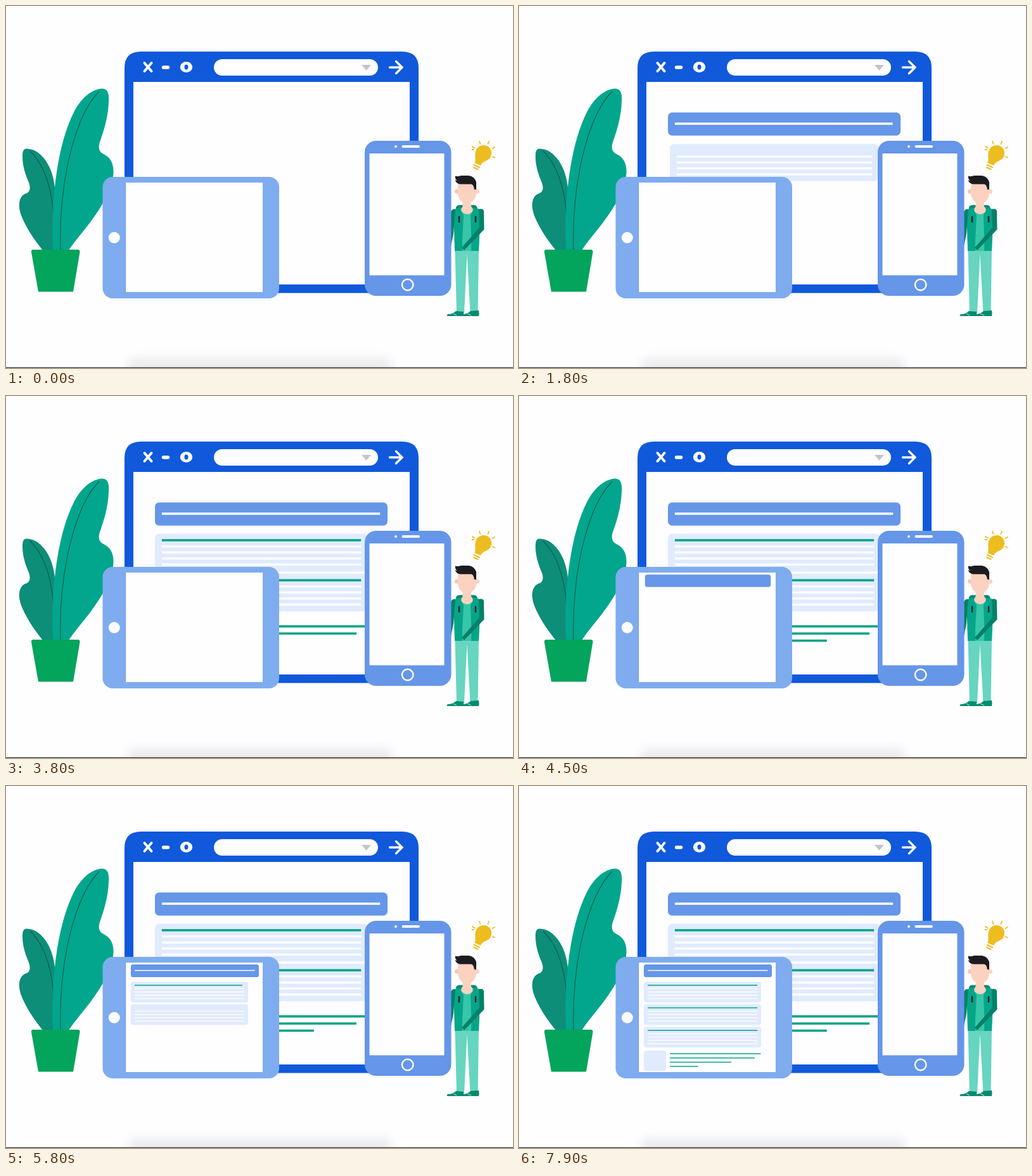
An HTML page that plays this animation: 800x572 px, repeating every 8 s.

```html
<!DOCTYPE html>
<html lang="en">
<head>
<meta charset="utf-8">
<title>Responsive layouts</title>
<style>
  html, body { margin: 0; width: 100%; height: 100%; overflow: hidden; background: #fefdff; }
  svg { display: block; width: 100vw; height: 100vh; }
</style>
</head>
<body>
<svg viewBox="0 0 800 572">
  <defs>
    <filter id="soft" x="-20%" y="-100%" width="140%" height="300%"><feGaussianBlur stdDeviation="8"/></filter>
  </defs>
  <rect width="800" height="572" fill="#fefdff"/>
  <rect x="193" y="557" width="415" height="40" rx="8" fill="#ebebec" filter="url(#soft)"/>
  <rect y="570.8" width="800" height="1.2" fill="#3c3c3f"/>

  <g id="plant">
    <path fill="#0d8e78" d="M33 225.500C44 226 52 231 61 242C72 257 77 275 78 300L80 386H58C44 369 29 346 23 328C18 311 22 299 32 296C38 294 39 287 36 279C29 263 26 250 26 237C26 229 28 225 33 225.500Z"/>
    <path fill="none" stroke="#0b5f53" stroke-width="1.200" d="M38 229C61 252 72 287 75 331"/>
    <path fill="#02a68c" d="M152 130.500C161 131 163 139 162 152C161 177 154 198 148 215C145 224 147 231 154 234C166 240 170 250 169.500 264C168 288 153 315 132 343C119 360 109 371 99 386H74C73 352 73 315 78 277C83 237 92 197 108 166C119 145 136 131 152 130.500Z"/>
    <path fill="none" stroke="#0b5f53" stroke-width="1.200" d="M147 135C112 170 83 268 86 386"/>
    <path fill="#03a45b" d="M43 385H113Q117 385 116.500 389L106 451.500H51L40 389Q39.500 385 43 385Z"/>
  </g>

  <g id="browser">
    <path fill="#1059db" d="M187 98Q187 72 213 72H625Q651 72 651 98V453.500H187Z"/>
    <rect x="201" y="120" width="436" height="320" fill="#fefdff"/>
    <g fill="none" stroke="#fefdff" stroke-linecap="round">
      <path stroke-width="4" d="M218.500 90L229.500 103M229.500 90L218.500 103"/>
      <path stroke-width="5.500" d="M248.500 97H255.500"/>
      <path stroke-width="3.400" d="M605.500 97H624M615.500 87.500L625 97L615.500 106.500"/>
    </g>
    <ellipse cx="284.500" cy="96.500" rx="9.700" ry="8.500" fill="#fefdff"/>
    <ellipse cx="284.500" cy="96.500" rx="3" ry="4" fill="#1059db"/>
    <rect x="328" y="84" width="259" height="26" rx="13" fill="#fefdff"/>
    <path fill="#c5c4c8" d="M561 93H576L568.500 102Z"/>
    <g id="browserPage"></g>
  </g>

  <g id="tablet">
    <rect x="152.500" y="270" width="278.500" height="192" rx="16" fill="#7facee"/>
    <rect x="189" y="279" width="216" height="173" fill="#fefdff"/>
    <path stroke="#6b97da" stroke-width="1" d="M188.500 279V452"/>
    <circle cx="170.800" cy="366" r="9" fill="#fefdff"/>
    <g id="tabletPage"></g>
  </g>

  <g id="man">
    <path fill="#67d5bf" d="M708.500 386H746L744.500 485H732.500L727.500 392L723 485H711Z"/>
    <path fill="#078b70" d="M710 482L722 483V490H697Q694 489 697 487Q705 487 710 482ZM733 482L746 481Q747 486 746 490H720Q717 489 720 487Q728 487 733 482Z"/>
    <path fill="none" stroke="#fefdff" stroke-width=".8" d="M706 486L711 489M728 486L734 489"/>
    <path fill="#058a70" d="M710 322Q709 315 715 314.500H739Q744 315 744 322Z"/>
    <path fill="#06a58a" d="M706 322Q711 319 718 319H737Q744 319 749 322L746 387H708Z"/>
    <path fill="#36c6a8" d="M718 321H737L734 387H720Z"/>
    <path fill="#06a58a" d="M717 320L722 331L719 387H708L709 321ZM737 320L733 331L735 387H746L747 321Z"/>
    <path fill="#fbd2bf" d="M720.500 305H734V317Q738 320 736 325Q728 333 719 325Q717 320 720.500 317Z"/>
    <path fill="none" stroke="#16272a" stroke-width="2.600" stroke-linecap="round" d="M715 333V341M741 333V341"/>
    <path fill="#068068" d="M702 325Q705 319 709 322L706 360L699.500 392Q696 394 694 391L699 356ZM746 321Q753 319 754 324L754.500 353L723 386L719 382L747 350Z"/>
    <circle cx="711.500" cy="293" r="3.500" fill="#f8c5b0"/>
    <circle cx="743.500" cy="293" r="3.500" fill="#fbd2bf"/>
    <path fill="#fbd2bf" d="M713 278H742V297Q740 311 727.500 311.500Q715 311 713 297Z"/>
    <path fill="#1c1b20" d="M709 268.500Q713 270 718 268H730Q739 269 742 278V290H739Q738 282 734 281.500H717Q711 281 708.500 275L712 276Q708 273 709 268.500Z"/>
  </g>

  <g id="bulb" fill="#edbd20" stroke="#edbd20" stroke-linecap="round">
    <path stroke="none" d="M741 230C743 222 751 218 759 221C767 225 768 235 763 241C758 246 752 245 749 252L739.500 248C742 241 739 238 741 230Z"/>
    <path fill="none" stroke-width="2" d="M738.500 251L747 255M738 255L744.500 258"/>
    <path fill="none" stroke-width="1.800" d="M747 214L748.500 218M762 214L760.500 218M771 223L767.500 225M771 239.500L767.500 238M736 222L739.500 224.500M735.500 227H738"/>
  </g>

  <g id="phone">
    <rect x="566" y="213" width="136.500" height="245" rx="18" fill="#6596e8"/>
    <rect x="573.500" y="233" width="118" height="192.500" fill="#fefdff"/>
    <circle cx="615" cy="222" r="2" fill="#fefdff"/>
    <rect x="624.500" y="220" width="28.500" height="4" rx="2" fill="#fefdff"/>
    <circle cx="633.700" cy="440.500" r="8.800" fill="none" stroke="#fefdff" stroke-width="2.400"/>
  </g>
</svg>
<script>
const LOOP = 8000;
const WHITE = '#fefdff', GREEN = '#06a487', PALE = '#e0ebfe', BLUE = '#6596e8';
const updates = [];

function add(parent, tag, attrs) {
  const node = document.createElementNS('http://www.w3.org/2000/svg', tag);
  for (const key in attrs) node.setAttribute(key, attrs[key]);
  return parent.appendChild(node);
}

function ease(p) {
  p = Math.min(1, Math.max(0, p));
  return p < .5 ? 4 * p ** 3 : 1 - 4 * (1 - p) ** 3;
}

// A rounded panel that grows from its centre.
function panel(parent, x, y, w, h, r, fill, start, dur = 600) {
  const group = add(parent, 'g', {});
  const cx = x + w / 2, cy = y + h / 2;
  add(group, 'rect', { x, y, width: w, height: h, rx: r, fill });
  updates.push(t => {
    const k = ease((t - start) / dur);
    group.setAttribute('visibility', k ? 'visible' : 'hidden');
    group.setAttribute('transform', `translate(${cx} ${cy}) scale(${k}) translate(${-cx} ${-cy})`);
  });
  return group;
}

function stroke(parent, x, y, w, thick, color) {
  return add(parent, 'rect', { x, y: y - thick / 2, width: w, height: thick, fill: color });
}

// A line that is drawn from left to right.
function drawn(parent, x, y, w, thick, color, start, dur = 600) {
  const line = stroke(parent, x, y, 0, thick, color);
  updates.push(t => line.setAttribute('width', w * ease((t - start) / dur)));
}

function page(id, { x, y, scale: s, thick, blocks, pitch, footer, gaps, start, footerStart }) {
  const root = document.getElementById(id);
  panel(root, x, y, 202 * s, 20 * s, 3.6 * s, BLUE, start);
  drawn(root, x + 6 * s, y + 10 * s - .5, 189.500 * s, thick, WHITE, start + 550);

  for (let i = 0; i < blocks; i++) {
    const top = y + (27.2 + i * pitch) * s;
    const begin = start + 600 * (i + 1);
    const block = panel(root, x, top, 185 * s, 32.7 * s, 4 * s, PALE, begin);
    for (let j = 0; j < 4; j++) {
      stroke(block, x + 6 * s, top + (11 + j * 5.25) * s, 173 * s, thick, WHITE);
    }
    drawn(root, x + 6 * s, top + 5.6 * s, 173 * s, thick, GREEN, begin + 700);
  }

  panel(root, x, footer - 5 * s, 35 * s, 32 * s, 4 * s, PALE, footerStart - 400, 500);
  [143.5, 134, 97, 44.5].forEach((w, i) =>
    drawn(root, x + 41 * s, footer + gaps * i, w * s, thick, GREEN, footerStart + 300 * i, 400));
}

page('browserPage', {
  x: 235, y: 168.3, scale: 1.817, thick: 3.6, blocks: 2, pitch: 34.8,
  footer: 364, gaps: 11.3, start: 700, footerStart: 3050
});
page('tabletPage', {
  x: 197, y: 282, scale: 1, thick: 1.5, blocks: 3, pitch: 35.7,
  footer: 423, gaps: 6.7, start: 4000, footerStart: 6600
});

function frame(now) {
  const t = now % LOOP;
  updates.forEach(update => update(t));
  requestAnimationFrame(frame);
}
frame(0);
</script>
</body>
</html>
```
